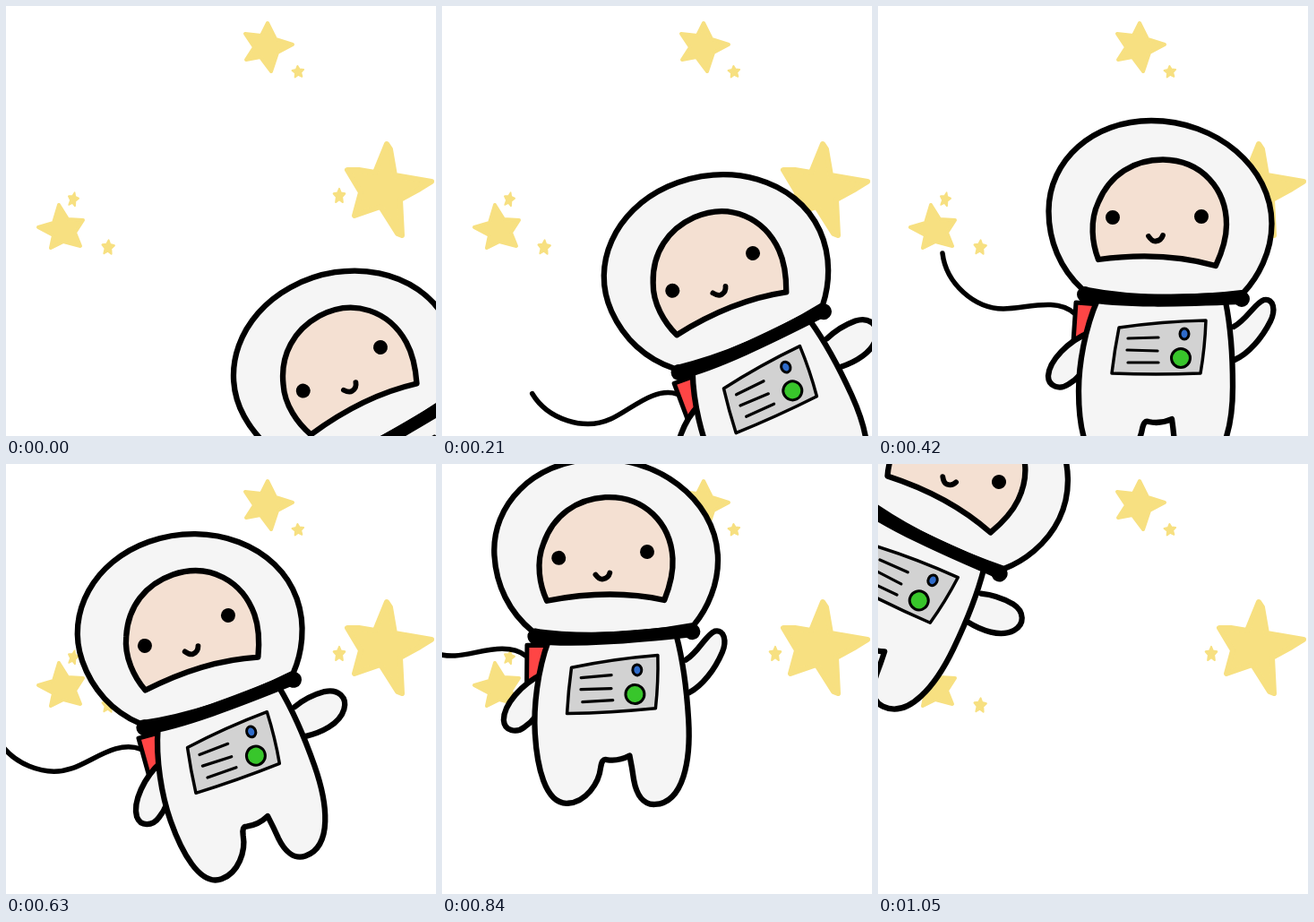
Recreate the animation shown at these times as an HTML page. Size 480 by 480 pixels, loop 1.26 s.

```html
<!DOCTYPE html>
<html lang="en">
<head>
<meta charset="utf-8">
<title>Floating astronaut</title>
<style>
  html, body { margin: 0; width: 100%; height: 100%; overflow: hidden; background: #fff; }
  svg { display: block; width: 100%; height: 100%; }
  .stars { fill: #f7e081; stroke: #f7e081; stroke-linejoin: round; }
  #astronaut { fill: #f5f5f5; stroke: #000; stroke-width: 6.3; stroke-linecap: round; stroke-linejoin: round; }
</style>
</head>
<body>
<svg viewBox="0 0 480 480">
  <defs>
    <polygon id="spark" stroke-width="2" points="0,-7 2,-3 6.7,-2.2 3.3,1 4.1,6 0,3.5 -4.1,6 -3.3,1 -6.7,-2.2 -2,-3"/>
  </defs>

  <g class="stars">
    <polygon stroke-width="6" points="425,154 429,160 434,189 475,196 462,204 440,216 442,256 437,254 418,224 389,234 396,208 381,183 394,183 412,186"/>
    <polygon stroke-width="4" points="292,19 301,37 320,43 303,52 296,73 284,57 268,60 277,46 267,31 285,33"/>
    <polygon stroke-width="4" points="59,222 69,238 86,239 77,253 83,268 64,263 50,270 53,256 36,247 53,242"/>
    <use href="#spark" transform="translate(326 73.5) rotate(-5) scale(.95)"/>
    <use href="#spark" transform="translate(75 216) rotate(12) scale(.85 1.1)"/>
    <use href="#spark" transform="translate(114 269.5) rotate(4) scale(1 1.15)"/>
    <use href="#spark" transform="translate(372 212) scale(.95 1.15)"/>
  </g>

  <g id="astronaut">
    <path fill="none" stroke-width="5.5" d="M72 276C76 310 108 338 140 338C165 338 198 325 219 343"/>
    <path fill="#ff4545" stroke-width="5" d="M221 331L247 333L236 366L218 375Z"/>
    <path d="M237 364C212 374 191 396 190 413C190 425 203 429 213 422Q220 418 226 411"/>
    <path id="arm"/>
    <path d="M245 328C231 360 224 400 224 430C224 465 230 510 256 510C276 510 292 490 295 472
             Q297 462 302 464Q315 467 328 461Q330 475 331 488C333 505 340 517 353 517
             C385 517 396 470 396 425C396 390 394 360 388 330Z"/>

    <path fill="#d2d2d2" stroke-width="3.5" d="M269 359Q317 352 366 351Q365 381 360 410Q310 412 261 410Q264 384 269 359Z"/>
    <path stroke-width="3.2" d="M279 371L313 370M278 384L312 385M279 398L313 398"/>
    <ellipse fill="#2f6bc9" stroke-width="3" cx="342" cy="366" rx="5" ry="6"/>
    <circle fill="#38c62b" stroke-width="3" cx="338" cy="393" r="10.5"/>

    <path d="M228 316C203 293 190.500 262 190.500 229C190.500 172 240 128 305 128
             C378 128 439.500 180 439.500 243C439.500 275 424 303 408 320Q310 332 228 316Z"/>
    <path fill="none" stroke-width="14" d="M231 323C270 331 340 329 406 326"/>
    <path stroke-width="18" d="M231 322h0M406 327h0"/>

    <path fill="#f4e0d2" d="M246 283C239 265 236 240 246 219C259 188 286 171.500 318 171.500
             C362 172 389 205 389 244C389 261 383 277 377 290C335 278 290 277 246 283Z"/>
    <path stroke-width="16" d="M262 236h0M361 235h0"/>
    <path fill="none" stroke-width="5.800" d="M302 257Q306 263 310 262.500Q316 262 318 256"/>
  </g>
</svg>

<script>
  const HOLD = 210;
  const PIVOT = [361, 235]; // right eye

  // x and y of the pivot, then tilt in degrees
  const poses = [
    [418, 381, -28.8],
    [347, 276, -24.4],
    [361, 235, 0],
    [248, 169, -19.45],
    [229, 98, -3.4],
    [135, 20, 25.7]
  ];
  const armDown = "M397 356C408 352 420 350 434 351C450 353 456 366 448 377C438 391 415 393 397 391";
  const armUp = "M397 358C412 350 421 331 431 328C442 326 444 340 438 352C429 370 414 388 398 395";

  const astronaut = document.getElementById("astronaut");
  const arm = document.getElementById("arm");
  const start = performance.now();

  function draw(now) {
    const step = Math.floor(Math.max(0, now - start) / HOLD) % poses.length;
    const [x, y, tilt] = poses[step];
    astronaut.setAttribute("transform",
      `translate(${x} ${y}) rotate(${tilt}) translate(${-PIVOT[0]} ${-PIVOT[1]})`);
    arm.setAttribute("d", step % 2 ? armDown : armUp);
    requestAnimationFrame(draw);
  }
  draw(start);
</script>
</body>
</html>
```
